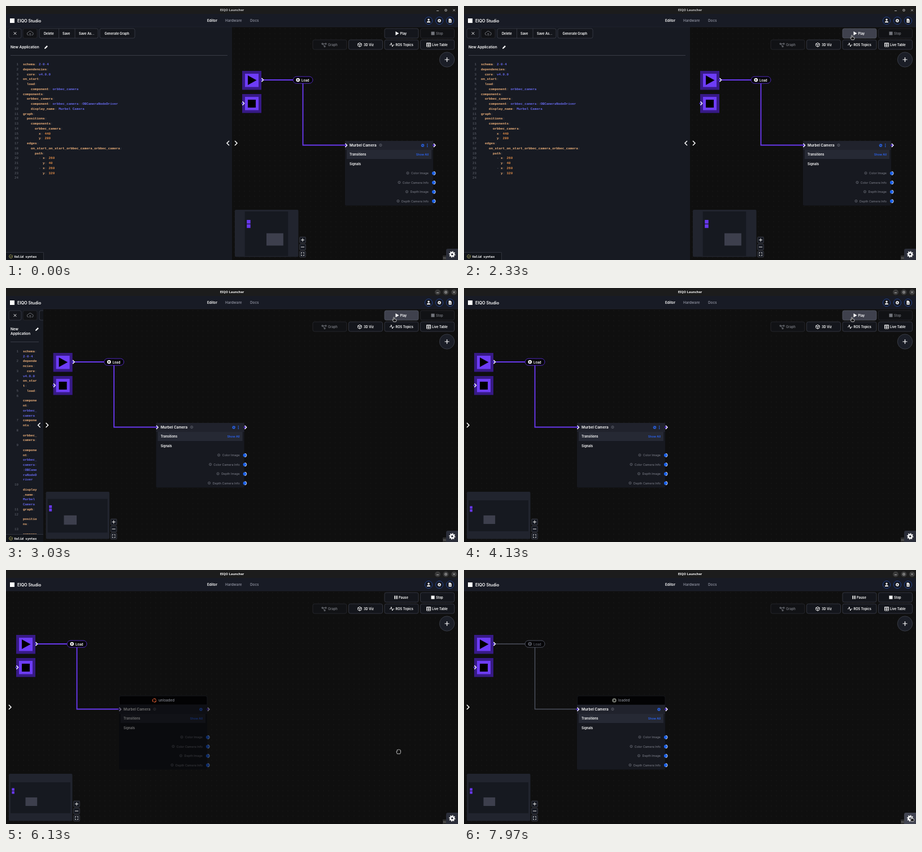
Recreate the animation shown at these times as an HTML page. Size 800x450 px, loop 8 s.

```html
<!DOCTYPE html>
<html lang="en">
<head>
<meta charset="utf-8">
<title>Studio</title>
<style>
html, body { margin: 0; width: 100%; height: 100%; overflow: hidden; background: #0f0f0f; }
#stage { position: relative; width: 800px; height: 450px; overflow: hidden; font-family: Inter, sans-serif; color: #fff; }
svg { position: absolute; left: 0; top: 0; }
text { font: 600 5.7px Inter, sans-serif; fill: #fff; dominant-baseline: central; }
.mid { text-anchor: middle; }
.end { text-anchor: end; }

#panel { position: absolute; left: 0; top: 37px; height: 413px; background: #171a22; overflow: hidden; }
#panel svg { overflow: visible; }
#name { position: absolute; left: 8px; right: 8px; top: 31.6px; }
#name .row { display: flex; gap: 8px; }
#name h2 { margin: 0; font: 600 6.4px/8.75px Inter, sans-serif; }
#name .pen { position: static; flex: none; }
#name hr { margin: 9.4px 0 12.4px; border: 0; border-top: .6px solid #393c47; }
.line { display: flex; margin-left: -8px; font: 5.85px/8.75px "Liberation Mono", monospace; }
.line i { flex: none; width: 22px; margin-right: 8px; text-align: right; font-style: normal; color: #666974; }
.line code { flex: none; width: calc(var(--w) - 38px); font: bold 5.85px/8.75px "Liberation Mono", monospace;
  white-space: pre-wrap; overflow-wrap: break-word; color: #686bf0; }
.key { color: #efb27c; }
.num { color: #e08c48; }
.dim { color: #565965; }
#valid { position: absolute; left: 0; bottom: 0; width: 66px; height: 13px; background: #12151b;
  border: solid #30333d; border-width: .6px .6px 0 0; border-radius: 0 2px 0 0; }
#valid span { position: absolute; left: 14.5px; top: 2.5px; font: bold 5.5px/8px "DejaVu Sans Mono", monospace; white-space: pre; }

.btn rect { fill: #14161c; stroke: #3b3e49; stroke-width: .8; }
.ico { fill: none; stroke: #fff; stroke-width: .9; }
.solid { fill: #fff; }
.btn.off rect { fill: #111215; stroke: #292a30; }
.btn.off text { fill: #74767d; }
.btn.off .ico { stroke: #74767d; }
.btn.off .solid { fill: #74767d; }
.hover .play rect { fill: #3f414d; stroke: #555864; }
.run .idle, .status .menu, .stage-idle, .ring { display: none; }
.busy { display: none; }
.run .busy, .status .badge { display: block; }
.badge { display: none; }
.status .cog { transform: translateX(7.5px); }
.halo { fill: none; }
.focus .halo { fill: #3a3a3a; }
#title { font: bold 5.7px "Noto Sans", sans-serif; fill: #c9c9c9; }
.focus #title { fill: #fff; }
.edge { fill: none; stroke: #6838ee; stroke-width: 1.9; }
.pill { fill: #050507; stroke: #5129bd; stroke-width: 1; }
.loaded .edge, .loaded .pill { stroke: #4c505d; }
.loaded .edge { stroke-width: 1.5; }
.loaded .load { fill: #555862; }
.up, .loaded .down { display: none; }
.loaded .up { display: block; }
.status:not(.loaded) #node { filter: brightness(.45); }
.badge text { font-weight: 500; font-size: 6.3px; fill: #858892; }
.sig { font-weight: 400; font-size: 5.4px; fill: #80838e; }
.info { fill: none; stroke: #80838e; stroke-width: .6; }
#corner { fill: #2b2e39; }
.gearhover #corner { fill: #424552; }
#cursor path { fill: #111; stroke: #e8e8e8; stroke-width: .8; stroke-linejoin: round; }
</style>
</head>
<body>
<div id="stage">
  <div id="panel">
    <svg width="400" height="413" id="tools"></svg>
    <div id="name">
      <div class="row"><h2>New Application</h2>
        <svg class="pen" width="8" height="8"><path d="M1 7l.4-2L5.3 1.1 6.9 2.7 3 6.6z" fill="#fff"/></svg></div>
      <hr>
      <div id="code"></div>
    </div>
    <div id="valid"><svg width="14" height="14"><path d="M11.4 5.6A3 3 0 1 1 9.6 3.9M7 6.4l1.4 1.4 3-3.4" fill="none" stroke="#b8b25a" stroke-width=".8"/></svg><span>Valid syntax</span></div>
  </div>

  <svg width="800" height="450" id="view">
    <defs>
      <pattern id="dots" width="9" height="9" patternUnits="userSpaceOnUse"><circle cx="4" cy="4" r=".5" fill="#222"/></pattern>
      <g id="gear" fill="none"><circle r="2.5" stroke-width="2"/><circle r="3.9" stroke-width="1.6" pathLength="16" stroke-dasharray="1"/></g>
      <g id="info" class="info"><circle r="2.1"/><path d="M0-.3V1.2M0-1.2V-.7"/></g>
      <g id="arrow"><path d="M-2.8 0L.2-3.2 3.2 0 .2 3.2z" fill="#4a2ac0"/><path d="M-.6-3.2L2.6 0-.6 3.2" fill="none" stroke="#fff" stroke-width="1.3"/></g>
      <g id="port"><circle r="3.1" fill="#1c62ea"/><path d="M0-3.2A3.2 3.2 0 0 1 0 3.2" fill="none" stroke="#dfe6f5" stroke-width=".9"/></g>
    </defs>

    <g id="graph">
      <rect y="37" width="800" height="413" fill="url(#dots)"/>
      <path class="edge" d="M55 131H125.5V246.5H201"/>
      <g id="blocks"></g>
      <path d="M28 123L43.5 131.5 28 140zM28 166h14v14h-14z"/>
      <use href="#arrow" x="53" y="131"/><use href="#arrow" x="19" y="172.5"/>
      <rect class="pill" x="108" y="125" width="35" height="12" rx="6"/>
      <circle class="solid load" cx="116.7" cy="131" r="3.3"/><path d="M115.7 129.2l2.8 1.8-2.8 1.8z"/>
      <text class="load" x="123" y="131">Load</text>

      <g class="badge">
        <path d="M200.5 239V226q0-3 3-3H353q3 0 3 3V239z" fill="#030304" stroke="#1b1d25" stroke-width=".7"/>
        <g class="down"><circle cx="262.5" cy="231" r="3.1" fill="none" stroke="#c2512c" stroke-width="1.4" pathLength="12" stroke-dasharray="3.4 .6"/><text x="270" y="231">unloaded</text></g>
        <g class="up"><circle cx="266" cy="231" r="3.8" fill="#73766f"/><path d="M265 229l3.2 2-3.2 2z"/><text x="273" y="231">loaded</text></g>
      </g>
      <g id="node">
        <rect x="200" y="239" width="156" height="114.5" rx="2" fill="#171920"/>
        <rect x="200" y="239" width="156" height="16" fill="#20222c"/>
        <rect x="203" y="255" width="150" height="16" fill="#262934"/>
        <text x="208" y="246.5" style="font-size:6.4px">Murbel Camera</text>
        <use href="#info" x="263" y="246.5"/>
        <g class="cog"><use href="#gear" stroke="#2a67f0" transform="translate(337.5 247) scale(.65)"/></g>
        <path class="menu" d="M345.7 244v6" stroke="#2a67f0" stroke-width="1.4" stroke-dasharray="1.3 1"/>
        <use href="#arrow" x="201" y="246.8"/><use href="#arrow" x="357.5" y="246.8"/>
        <text x="208" y="263" style="font-size:5.5px">Transitions</text>
        <text class="end" x="348" y="263" style="font-size:5.3px;fill:#2b62ee">Show All</text>
        <text x="208" y="279.5">Signals</text>
        <g id="signals"></g>
      </g>

      <rect x="5" y="361" width="112.5" height="83.5" rx="2" fill="#21242e"/>
      <g id="mini">
        <rect y="37" height="413" fill="#161920" id="window"/>
        <path d="M18 115h34v34h-34zM18 156h34v34h-34z" fill="#6838ee"/>
        <rect x="200" y="239" width="156" height="114" fill="#3d3f4d"/>
      </g>
      <g id="zoom"></g>
      <path d="M-5 239l-4 4 4 4M5 239l4 4-4 4" fill="none" stroke="#fff" stroke-width="1.5"/>
    </g>

    <rect width="800" height="14" fill="#1c1c1c"/>
    <rect y="14" width="800" height="23" fill="#181b25"/>
    <path d="M0 37H800" stroke="#242833" stroke-width=".6"/>
    <text id="title" class="mid" x="400" y="7.3">EIQO Launcher</text>
    <g class="halo"><circle cx="764" cy="7.5" r="5"/><circle cx="778.5" cy="7.5" r="5"/><circle cx="793" cy="7.5" r="5"/></g>
    <path d="M762 8.5h4M777 6h3v3h-3zM791.2 5.7l3.6 3.6m0-3.6l-3.6 3.6" fill="none" stroke="#ccc" stroke-width=".8"/>
    <rect class="solid" x="7" y="22" width="8" height="8"/>
    <text x="20" y="26.3" style="font-size:7.3px">EIQO Studio</text>
    <g style="font-size:6.4px" id="nav"></g>
    <g fill="#131620" stroke="#274a9a" stroke-width=".9"><circle cx="748" cy="26" r="6.6"/><circle cx="767" cy="26" r="6.6"/><circle cx="786" cy="26" r="6.6"/></g>
    <path class="solid" d="M746.3 24.3a1.7 1.7 0 1 1 3.4 0a1.7 1.7 0 1 1-3.4 0M744.8 29.3q0-2.6 3.2-2.6t3.2 2.6zM783.5 22.5h3.2l1.9 1.9v5h-5.1z"/>
    <path d="M784.6 26h3m-3 1.5h3" stroke="#181b25" stroke-width=".6"/>
    <use href="#gear" stroke="#fff" transform="translate(767 26) scale(.7)"/>

    <g id="buttons"></g>
    <circle cx="780.5" cy="95" r="13.2" fill="#1b1e27" stroke="#41444f" stroke-width=".8"/>
    <path d="M776.5 95h8m-4-4v8" stroke="#fff" stroke-width="1.2"/>
    <rect x="773" y="442" width="7" height="8" fill="#2c2c2c"/>
    <text x="774" y="446.3" style="font-size:4px;font-weight:400;fill:#888">Re</text>
    <path id="corner" d="M779 450V433q0-3 3-3h18v20z"/>
    <use href="#gear" stroke="#fff" transform="translate(789.7 440) scale(1.2)"/>
    <g id="cursor">
      <path id="grab" d="M-2.6 4.2L-4 .6q0-1.4 1.2-.6V-2.6q.8-1.4 1.6-.2 .8-1.6 1.7 0 .9-1.2 1.7 .2 1-.5 1.3 .7V2L2.5 4.2z"/>
      <path id="point" d="M-1.7-3.3q.8-1.1 1.5 0V-.6q2.8 .2 3.6 1.2V2.6L2.6 4.3H-1.6L-3.7 1q.3-1 2 0z"/>
    </g>
  </svg>
</div>

<script>
const $ = id => document.getElementById(id);
const fill = (id, items) => $(id).innerHTML = items.join('');

const source = `schema: 2-0-4
dependencies:
  core: v4.0.0
on_start:
  load:
    component: orbbec_camera
components:
  orbbec_camera:
    component: orbbec_camera::OBCameraNodeDriver
    display_name: Murbel Camera
graph:
  positions:
    components:
      orbbec_camera:
        x: 440
        y: 280
  edges:
    on_start_on_start_orbbec_camera_orbbec_camera:
      path:
        - x: 260
          y: 40
        - x: 260
          y: 320
`;
const span = (cls, s) => `<span class="${cls}">${s}</span>`;
const paint = line => line.replace(/^(\s*)(- )?(\w+):(.*)$/, (_, pad, dash, key, val) =>
  pad + (dash ? span('dim', dash) : '') + span('key', key) + span('dim', ':') +
  (/^ \d+$/.test(val) ? span('num', val) : val.replace(/[-:]/g, c => span('dim', c))));
fill('code', source.split('\n').map((l, i) => `<div class="line"><i>${i + 1}</i><code>${paint(l)}</code></div>`));

const button = (x, y, w, label, tx, icon = '', cls = '') =>
  `<g class="btn ${cls}"><rect x="${x}" y="${y}" width="${w}" height="17" rx="3"/>${icon}` +
  `<text x="${tx}" y="${y + 8.5}">${label}</text></g>`;
const line = d => `<path class="ico" d="${d}"/>`;
const solid = d => `<path class="solid" d="${d}"/>`;
const square = solid('M752.5 45.5h6v6h-6z');

fill('tools', [
  button(5, 3, 22, '', 0, line('M13.7 9.2l4.6 4.6m0-4.6l-4.6 4.6')),
  button(30, 3, 25, '', 0, line('M40.5 14.5h-.8a2.4 2.4 0 0 1 0-4.8 3.3 3.3 0 0 1 6.2 0 2.4 2.4 0 0 1 0 4.8h-.8M42.8 16v-4.4m-1.5 1.4l1.5-1.5 1.5 1.5'), 'off'),
  button(59, 3, 104, 'Delete', 67),
  '<path d="M93.5 3v17M122 3v17" stroke="#3b3e49" stroke-width=".8"/><text x="100" y="11.5">Save</text><text x="129" y="11.5">Save As...</text>',
  button(166, 3, 62, 'Generate Graph', 174.5)
]);

fill('buttons', [
  `<g class="idle">${button(670, 40, 60, 'Play', 697.5, solid('M689.5 45l6 3.5-6 3.5z'), 'play')}${button(733.5, 40, 60, 'Stop', 761, square, 'off')}</g>`,
  `<g class="busy">${button(670, 40, 60, 'Pause', 695, solid('M687.5 45.5h1.8v6h-1.8zM690.9 45.5h1.8v6h-1.8z'))}${button(733.5, 40, 60, 'Stop', 761, square)}</g>`,
  button(543, 60, 60, 'Graph', 570, line('M559 66h2v2h-2zM565 66h2v2h-2zM563 70.5h2v2h-2zM561 67h4M560.5 68l3 2.5'), 'off'),
  button(606.5, 60, 60, '3D Viz', 633, line('M626 65.2l3.2 1.7v3.6L626 72.3l-3.2-1.8v-3.6zM622.8 66.9l3.2 1.7 3.2-1.7M626 68.6v3.7')),
  button(670, 60, 60, 'ROS Topics', 689.5, line('M679 69h1.6l1.3-3.5 2 6.5 1.4-3h2')),
  button(733.5, 60, 60, 'Live Table', 754, line('M744.5 65.5h7v6.5h-7zM744.5 67h7M744.5 69.5h7M748 67v5'))
]);

fill('nav', [['Editor', 356, '#fff'], ['Hardware', 388, '#868996'], ['Docs', 432, '#868996']].map(([s, x, c]) =>
  `<text x="${x}" y="26" style="font-size:6.3px;fill:${c}">${s}</text>`));
fill('blocks', [115, 156].map(y =>
  `<rect x="18" y="${y}" width="34" height="33.5" fill="#371a86"/><rect x="23" y="${y + 5}" width="24" height="23.5" fill="#6d3cf6"/>`));
fill('signals', [['Color Image', 311], ['Color Camera Info', 296], ['Depth Image', 309.5], ['Depth Camera Info', 294]].map(([s, x], i) => {
  const y = 296 + 16.5 * i;
  return `<use href="#info" x="${x}" y="${y}"/><text class="sig end" x="348" y="${y}">${s}</text><use href="#port" x="357" y="${y + .3}"/>`;
}));
fill('zoom', ['M122 414.5h6m-3-3v6', 'M122 427h6', 'M122.5 438.5v-1.5h1.7m1.6 0h1.7v1.5m0 2v1.5h-1.7m-1.6 0h-1.7v-1.5'].map((d, i) =>
  `<rect x="119.7" y="${409.2 + 12.5 * i}" width="10.6" height="10.6" rx="1.5" fill="#171a22" stroke="#4a4d58" stroke-width=".7"/>${line(d)}`));

// The standard "ease" curve: cubic-bezier(.25, .1, .25, 1)
function ease(x) {
  if (x <= 0 || x >= 1) return Math.min(1, Math.max(0, x));
  const curve = (a, b, s) => 3 * a * s * (1 - s) ** 2 + 3 * b * s * s * (1 - s) + s ** 3;
  let lo = 0, hi = 1;
  for (let i = 0; i < 20; i++) {
    const mid = (lo + hi) / 2;
    curve(.25, .25, mid) < x ? lo = mid : hi = mid;
  }
  return curve(.1, 1, lo);
}

// time, x, y
const route = [[0, 805, 460], [350, 805, 460], [950, 661, 112], [1570, 661, 112], [2150, 687.5, 55.5],
  [4900, 687.5, 55.5], [5370, 695, 321.5], [7400, 695, 321.5], [7900, 793, 441], [8000, 793, 441]];
function pointer(t) {
  const i = route.findIndex(p => p[0] > t), [t0, x0, y0] = route[i - 1], [t1, x1, y1] = route[i];
  const k = (t - t0) / (t1 - t0), s = k * k * (3 - 2 * k);
  return [x0 + (x1 - x0) * s, y0 + (y1 - y0) * s];
}

function frame() {
  const t = performance.now() % 8000;
  const w = 400 * (1 - ease((t - 2495) / 1000)), span = 800 - w;
  const [x, y] = pointer(t);
  const onPlay = x > 670 && x < 730 && y < 58, onGear = x > 779 && y > 430;

  $('panel').style.width = w + 'px';
  $('panel').style.setProperty('--w', Math.max(w, 45) + 'px');
  $('graph').setAttribute('transform', `translate(${w})`);
  const scale = Math.min(106 / span, 79 / 413);
  $('window').setAttribute('width', span);
  $('mini').setAttribute('transform', `translate(61 403.5) scale(${scale}) translate(${-span / 2} -243.5)`);

  $('cursor').setAttribute('transform', `translate(${x} ${y})`);
  $('point').style.display = onPlay || onGear ? '' : 'none';
  $('grab').style.display = onPlay || onGear ? 'none' : '';

  const state = { focus: t >= 2430, hover: onPlay, run: t >= 4500, status: t >= 4950, loaded: t >= 6400, gearhover: onGear && t > 7000 };
  for (const k in state) $('view').classList.toggle(k, state[k]);
  requestAnimationFrame(frame);
}
frame();
</script>
</body>
</html>
```
